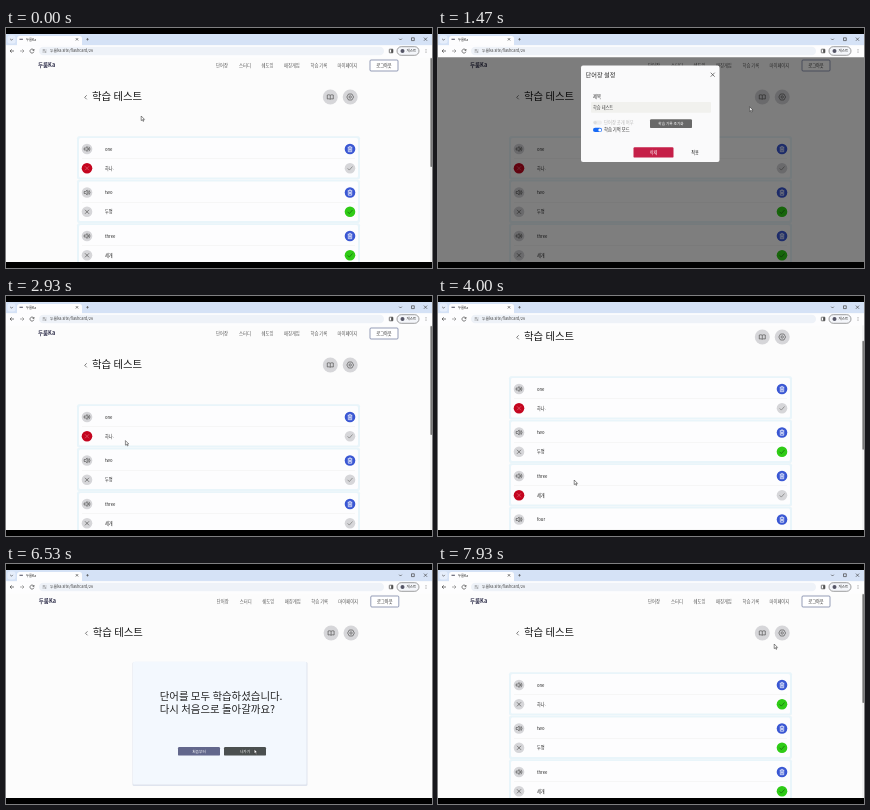
Write an HTML page with a canvas that moves like this. It is 426 px wide and 240 px high and loops after 8000 ms.

```html
<!DOCTYPE html>
<html lang="ko">
<head>
<meta charset="utf-8">
<style>
html, body { margin: 0; height: 100%; overflow: hidden; background: #000; }
canvas { display: block; width: 100vw; height: 100vh; }
</style>
</head>
<body>
<canvas></canvas>
<script>
const canvas = document.querySelector('canvas');
const ctx = canvas.getContext('2d');
const LOOP = 8000, STEP = 1000 / 15;
const RED = '#c4051f', GREEN = '#2fcb16', BLUE = '#3a57d3', GRAY = '#d6d6d9', INK = '#222';
const BRAND = '두룸Ka';
const WORDS = [['one', '하나.'], ['two', '두명'], ['three', '세개'], ['four', '네개'], ['five', '다섯']];
const NONE = 0, WRONG = 1, RIGHT = 2;

// time, x, y
const CURSOR = [
  [0, 136, 90], [130, 136, 90], [600, 344, 69], [1200, 344, 69], [1850, 258, 101],
  [2000, 256, 100], [2150, 240, 97], [2220, 240, 97], [2400, 257, 125], [2500, 257, 125],
  [2750, 81, 140], [2870, 81, 140], [3130, 344, 184], [3220, 344, 184], [3480, 81, 228],
  [3600, 81, 228], [3900, 137, 186], [4150, 137, 186], [4550, 324, 69], [4720, 324, 69],
  [5050, 206, 203], [6270, 206, 203], [6460, 249, 187], [6720, 249, 187], [7350, 337, 82], [8000, 337, 82]
];
const SCROLL = [[0, 0], [3620, 0], [3850, 28], [4100, 28], [4350, 0], [8000, 0]];

// Eased interpolation through a key list
function sample(keys, t) {
  let i = 1;
  while (i < keys.length - 1 && keys[i][0] < t) i++;
  const a = keys[i - 1], b = keys[i];
  const p = Math.min(1, (t - a[0]) / (b[0] - a[0]));
  const e = p * p * (3 - 2 * p);
  return a.slice(1).map((v, k) => v + (b[k + 1] - v) * e);
}

function marksAt(t) {
  if (t < 2200) return [WRONG, RIGHT, RIGHT, RIGHT, RIGHT];
  if (t >= 6660) return WORDS.map(() => RIGHT);
  return [t > 2840 ? WRONG : NONE, t > 3190 ? RIGHT : NONE, t > 3550 ? WRONG : NONE, NONE, NONE];
}

function box(x, y, w, h, fill, r = 0, stroke) {
  ctx.beginPath();
  ctx.roundRect(x, y, w, h, r);
  if (fill) { ctx.fillStyle = fill; ctx.fill(); }
  if (stroke) { ctx.strokeStyle = stroke; ctx.lineWidth = .7; ctx.stroke(); }
}

function disc(x, y, r, fill) {
  ctx.beginPath();
  ctx.arc(x, y, r, 0, 7);
  ctx.fillStyle = fill;
  ctx.fill();
}

function text(s, x, y, size, color = INK, align = 'left', weight = 400) {
  ctx.font = `${weight} ${size}px "Noto Sans CJK KR", "Noto Sans CJK", sans-serif`;
  ctx.textAlign = align;
  ctx.fillStyle = color;
  ctx.fillText(s, x, y + size * .36);
}

// Strokes an SVG path placed at x, y
function glyph(d, x, y, color = '#444', width = .7, scale = 1) {
  ctx.save();
  ctx.translate(x, y);
  ctx.scale(scale, scale);
  ctx.strokeStyle = color;
  ctx.lineWidth = width / scale;
  ctx.stroke(new Path2D(d));
  ctx.restore();
}

const ICON = {
  cross: 'M-2-2L2 2M2-2L-2 2',
  check: 'M-2.4 0L-.7 1.8L2.5-1.8',
  speaker: 'M-2.8-1H-1.5L.2-2.4V2.4L-1.5 1H-2.8ZM1.2-1.3Q2.2 0 1.2 1.3M2-2.3Q4 0 2 2.3',
  trash: 'M-2.2-1.8H2.2M-.8-2.6H.8M-1.7-1.8V2.7H1.7V-1.8M-.5-.7V1.6M.5-.7V1.6',
  book: 'M0-1.8Q-1.5-2.6-3-2V2Q-1.5 1.5 0 2.2Q1.5 1.5 3 2V-2Q1.5-2.6 0-1.8V2.2',
  gear: 'M-1.7-3H1.7L3.4 0L1.7 3H-1.7L-3.4 0ZM1.2 0A1.2 1.2 0 1 1-1.2 0A1.2 1.2 0 1 1 1.2 0',
  back: 'M1-2L-1 0L1 2',
  down: 'M-1.3-.6L0 .7L1.3-.6',
  plus: 'M-1.6 0H1.6M0-1.6V1.6',
  arrow: 'M2 0H-2M-.3-1.7L-2 0L-.3 1.7',
  reload: 'M1.8-.8A2 2 0 1 0 1.9 .7M2-2V-.6H.6',
  tune: 'M-1.8-1H.4M1.2-1H1.8M-1.8 1H-1M0 1H1.8'
};

function iconButton(name, x, y, fill, r = 5.3, color = '#555') {
  disc(x, y, r, fill);
  glyph(ICON[name], x, y, color);
}

function button(label, x, y, w, h, fill, size = 3.7) {
  box(x, y, w, h, fill, 1.2);
  text(label, x + w / 2, y + h / 2, size, '#fff', 'center', 500);
}

function browser() {
  box(0, 6, 426, 11.5, '#d5e2f6');
  box(1.5, 7.5, 8, 8, '#e6eefb', 2);
  glyph(ICON.down, 5.5, 11.5);
  box(11, 8, 65, 10, '#fdfdfe', [2.5, 2.5, 0, 0]);
  box(13.5, 10.7, 3.4, 1.2, '#667');
  text(BRAND, 20, 11.4, 3.3);
  glyph(ICON.cross, 71, 11.3, '#333', .6, .6);
  glyph(ICON.plus, 81.5, 11.3, '#444', .6, .8);
  glyph(ICON.down, 394.5, 11.3);
  box(405.5, 9.8, 2.8, 2.8, null, 0, '#444');
  glyph(ICON.cross, 419.5, 11.2, '#333', .6, .8);

  box(0, 17.3, 426, 12, '#fdfdfe');
  glyph(ICON.arrow, 6, 23);
  glyph(ICON.arrow, 16, 23, '#888', .6, -1);
  glyph(ICON.reload, 26, 23);
  box(33, 18.7, 345, 8.6, '#eef2f8', 4.3);
  glyph(ICON.tune, 38.5, 23);
  text(BRAND.toLowerCase() + '.site/flashcard/26', 44, 23, 3.9, '#444');
  box(383.3, 21.2, 3.6, 3.6, null, .4, '#444');
  box(385.2, 21.2, 1.7, 3.6, '#444');
  box(391, 18.7, 22, 8.6, '#f4f6fa', 4.3, '#777');
  disc(396.5, 23, 2, '#556');
  text('게스트', 400.5, 23, 3.5);
  [-1.6, 0, 1.6].forEach(d => disc(420, 23 + d, .45, '#444'));
}

function header(dx) {
  text(BRAND, 32 + dx, 37.3, 5.5, '#2c2c48', 'left', 600);
  const items = [['단어장', 210], ['스터디', 233], ['쉐도잉', 255.5], ['매칭게임', 278], ['학습 기록', 304.5], ['마이페이지', 331.5]];
  items.forEach(([label, x]) => text(label, x + dx, 37.3, 4.3, '#555'));
  box(364 + dx, 32, 28, 11, '#fff', 1, '#68749a');
  text('로그아웃', 378 + dx, 37.5, 4.2, INK, 'center', 500);
  glyph(ICON.back, 79.7 + dx, 69.3);
  text('학습 테스트', 86 + dx, 68.5, 10.4, '#181818');
  iconButton('book', 324.3 + dx, 69, GRAY, 7.5);
  iconButton('gear', 344.2 + dx, 69, GRAY, 7.5);
}

function wordCard([word, meaning], mark, y) {
  box(71, y - 12.7, 283, 43.2, '#e9f5fa', 2);
  box(73, y - 11, 279, 39.5, '#fdfdfe', 1.5);
  box(76, y + 9.5, 273, .5, '#f0f0f0');
  iconButton('speaker', 81, y, GRAY);
  text(word, 99, y, 4.2);
  iconButton('trash', 344, y, BLUE, 5.3, '#fff');
  const low = y + 19.3;
  iconButton('cross', 81, low, mark === WRONG ? RED : GRAY, 5.3, mark === WRONG ? '#e06070' : '#555');
  text(meaning, 99, low, 4.2);
  iconButton('check', 344, low, mark === RIGHT ? GREEN : GRAY, 5.3, mark === RIGHT ? '#186010' : '#777');
}

function listPage(t, modal) {
  const [scroll] = sample(SCROLL, t), marks = marksAt(t);
  ctx.save();
  ctx.translate(0, -scroll);
  header(0);
  WORDS.forEach((word, i) => wordCard(word, marks[i], 121 + i * 43.5));
  ctx.restore();
  if (!modal) {
    box(424, 29, 2, 205, '#f3f3f3');
    box(424.4, 30 + scroll * .53, 1.6, 109, '#777', .8);
  }
}

function settings() {
  box(0, 29, 426, 205, 'rgba(0,0,0,.5)');
  box(143, 37.5, 138.5, 96.5, '#fafafb', 2);
  text('단어장 설정', 147.5, 46.7, 6.2);
  glyph(ICON.cross, 274.7, 46.7, '#444', .7);
  text('제목', 155, 68.7, 4.3);
  box(153, 74, 120, 10.7, '#f1f1ee', 1);
  text('학습 테스트', 155, 79.5, 4.2, '#444');
  box(155, 92.5, 9, 4.2, '#eee', 2.1);
  disc(157.2, 94.6, 1.6, '#ddd');
  text('단어장 공개 여부', 166, 94.6, 4.3, '#bbb');
  box(155, 99.8, 9, 4.2, '#1769f5', 2.1);
  disc(161.8, 101.9, 1.5, '#fff');
  text('학습 기억 모드', 166, 101.9, 4.3);
  button('학습 기록 초기화', 212, 91.3, 42, 8.8, '#686868');
  button('삭제', 195.5, 119.2, 40, 10.4, '#c51f48', 4.2);
  text('적용', 257, 124.5, 4.2, INK, 'center', 500);
}

function studyPage(t) {
  header(.8);
  box(126.5, 98, 175, 124, '#dfe4ee', 1.5);
  box(127, 97.5, 173.5, 123, '#f3f8fe', 1.5);
  if (t >= 6270) {
    text('단어를 모두 학습하셨습니다.', 153.7, 132, 10.45);
    text('다시 처음으로 돌아갈까요?', 153.7, 145, 10.45);
    button('처음부터', 172, 183, 42, 8.6, '#62678c');
    button('나가기', 218, 183, 42, 8.6, t > 6400 ? '#4b5050' : '#62678c');
    return;
  }
  const index = Math.max(0, Math.min(4, Math.floor((t - 5270) / 200)));
  const [word, meaning] = WORDS[index];
  glyph(ICON.cross, 292, 107.5, '#555', .7, 1.1);
  iconButton('speaker', 213, 124.5, GRAY, 5);
  text(word, 213, 144.5, 8.7, INK, 'center');
  box(143, 163.8, 140, .8, '#888');
  if (t >= 5000) text(meaning, 213, 184.5, 8.6, INK, 'center');
  iconButton('check', 205.7, 204.8, GREEN, 5.5, '#186010');
  iconButton('cross', 218, 204.8, RED, 5.5, '#d04050');
}

function pointer(t) {
  const [x, y] = sample(CURSOR, t);
  ctx.save();
  ctx.translate(x - .8, y - 2);
  const shape = new Path2D('M0 0V4.6L1.1 3.7L1.9 5.4L2.7 5L1.9 3.4H3.3Z');
  ctx.fillStyle = '#fff';
  ctx.fill(shape);
  ctx.strokeStyle = '#222';
  ctx.lineWidth = .5;
  ctx.stroke(shape);
  ctx.restore();
}

function draw(now) {
  const w = Math.round(innerWidth * devicePixelRatio), h = Math.round(innerHeight * devicePixelRatio);
  if (canvas.width !== w || canvas.height !== h) { canvas.width = w; canvas.height = h; }
  const t = Math.floor((now % LOOP + 4) / STEP) * STEP;
  ctx.setTransform(w / 426, 0, 0, h / 240, 0, 0);
  box(0, 0, 426, 240, '#000');
  box(0, 6, 426, 228, '#fcfcfc');

  ctx.save();
  ctx.beginPath();
  ctx.rect(0, 29, 426, 205);
  ctx.clip();
  const modal = t >= 790 && t < 2500;
  if (t >= 4660 && t < 6660) studyPage(t);
  else listPage(t, modal);
  if (modal) settings();
  ctx.restore();

  browser();
  pointer(t);
}

function tick() {
  draw(performance.now());
  requestAnimationFrame(tick);
}
tick();
</script>
</body>
</html>
```
